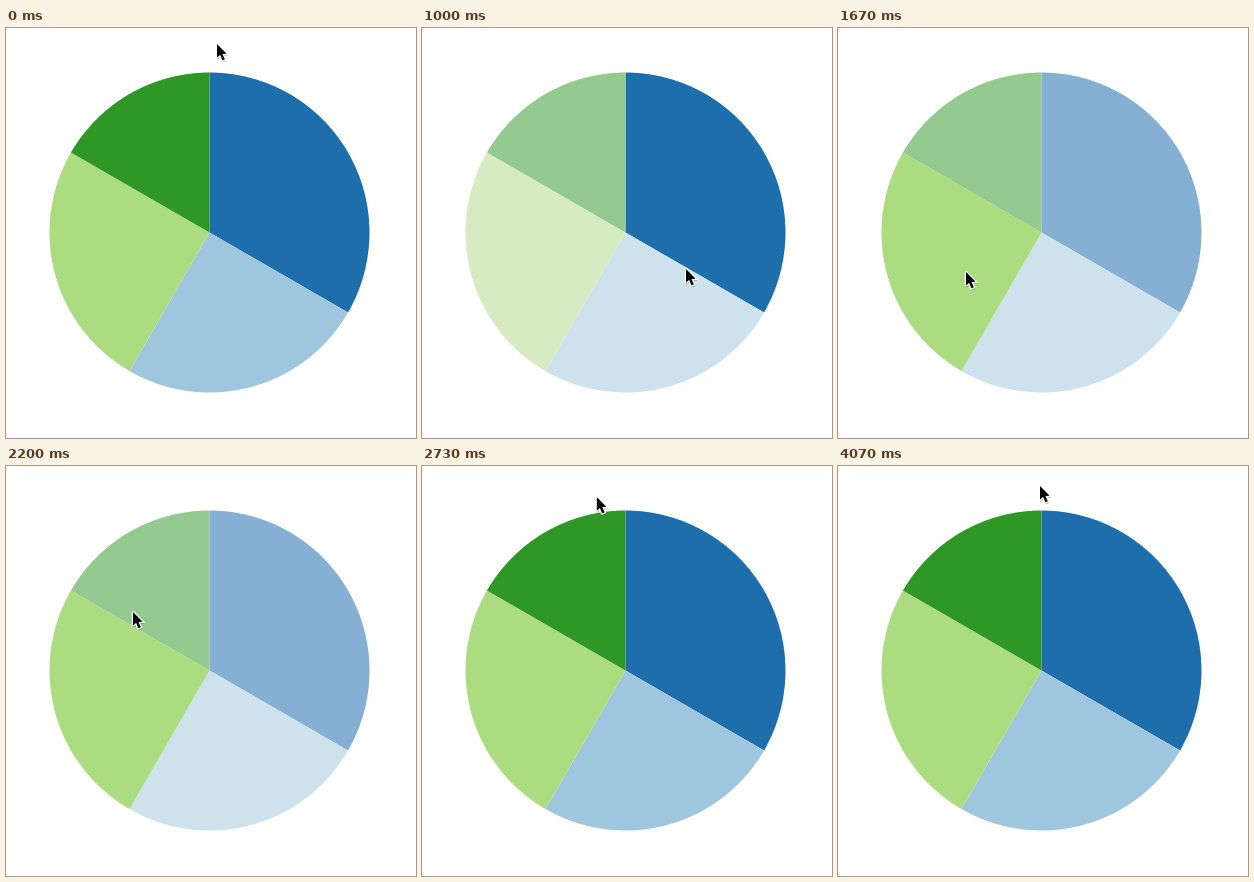
Recreate the animation shown at these times as a matplotlib script. Size 410 by 410 pixels, loop 4.33 s.

```python
import numpy as np
import matplotlib.pyplot as plt
from matplotlib.animation import FuncAnimation
from matplotlib.patches import Polygon, Wedge

SIZE, DPI = 410, 82               # divides evenly, so the canvas is exact
LOOP_MS, TICK_MS = 4330, 10
STEPS_PER_MS = 15 / 1000          # the pointer is sampled 15 times a second

CENTER, RADIUS = np.array([203.5, 204.5]), 160
EDGES = [0, 120, 210, 300, 360]   # degrees clockwise from the top
BRIGHT = ["#1d6eab", "#9ec6df", "#abdc80", "#2f9726"]
FADED = ["#86b0d3", "#cde2ec", "#d6ebc1", "#94ca8f"]

# pointer waypoints: step, x, y
PATH = np.array([
    (0, 211, 16), (1, 211, 16), (6, 245, 105), (9, 270, 167),
    (10, 271, 170), (12, 271, 170),
    (15, 264, 241), (18, 222, 288), (22, 165, 271), (25, 128, 244),
    (28, 112, 212), (30, 112, 212),
    (33, 127, 146), (37, 195, 96), (40, 173, 42), (43, 186, 18),
    (46, 197, 11.5), (49, 197, 11.5),
    (53, 198, 14.5), (55, 198, 14.5),
    (61, 202, 20), (65, 202, 20),
], dtype=float)
TIMES, POINTS = PATH[:, 0], PATH[:, 1:]

ARROW = np.array([(0, 0), (0, 13.6), (3.1, 10.8), (5.4, 16.3),
                  (7.8, 15.3), (5.5, 10), (9.6, 9.7)])


def tangents():
    """Central differences, zero wherever the pointer rests."""
    m = np.zeros_like(POINTS)
    for i in range(1, len(POINTS) - 1):
        before, here, after = POINTS[i - 1:i + 2]
        if (here != before).any() and (here != after).any():
            m[i] = (after - before) / (TIMES[i + 1] - TIMES[i - 1])
    return m


SLOPES = tangents()


def pointer(step):
    """Cubic Hermite position of the arrow tip."""
    step = max(step, 0)
    i = min(np.searchsorted(TIMES, step, side="right") - 1, len(TIMES) - 2)
    span = TIMES[i + 1] - TIMES[i]
    s = (step - TIMES[i]) / span
    blend = s * s * (3 - 2 * s)
    return (POINTS[i] * (1 - blend) + POINTS[i + 1] * blend
            + span * s * (1 - s) ** 2 * SLOPES[i]
            + span * s * s * (s - 1) * SLOPES[i + 1])


def hovered(point):
    """Index of the slice under the point, or None outside the pie."""
    dx, dy = point - CENTER
    if np.hypot(dx, dy) > RADIUS:
        return None
    angle = np.degrees(np.arctan2(dx, -dy)) % 360
    return int(np.searchsorted(EDGES, angle, side="right")) - 1


fig = plt.figure(figsize=(SIZE / DPI, SIZE / DPI), dpi=DPI, facecolor="white")
ax = fig.add_axes([0, 0, 1, 1])
ax.set_xlim(0, SIZE)
ax.set_ylim(SIZE, 0)
ax.axis("off")

slices = [ax.add_patch(Wedge(CENTER, RADIUS, a - 90, b - 90, fc=color, lw=0))
          for a, b, color in zip(EDGES, EDGES[1:], BRIGHT)]

PX = 72 / DPI
shadow = ax.add_patch(Polygon(ARROW, fc="black", ec="black", lw=1.6 * PX,
                              alpha=0.18, joinstyle="round", zorder=3))
outline = ax.add_patch(Polygon(ARROW, fc="white", ec="white", lw=2.4 * PX,
                               joinstyle="miter", zorder=4))
arrow = ax.add_patch(Polygon(ARROW, fc="black", lw=0, zorder=5))


def draw(tick):
    step = int((tick * TICK_MS + 5) * STEPS_PER_MS)
    tip = pointer(step)
    active = hovered(pointer(step - 1))   # highlight trails by one step
    for i, part in enumerate(slices):
        lit = active is None or active == i
        part.set_facecolor((BRIGHT if lit else FADED)[i])
    shadow.set_xy(ARROW + tip + (0.6, 1.4))
    outline.set_xy(ARROW + tip)
    arrow.set_xy(ARROW + tip)
    return [*slices, shadow, outline, arrow]


anim = FuncAnimation(fig, draw, frames=LOOP_MS // TICK_MS, interval=TICK_MS,
                     repeat=True, repeat_delay=0)
plt.show()
```
